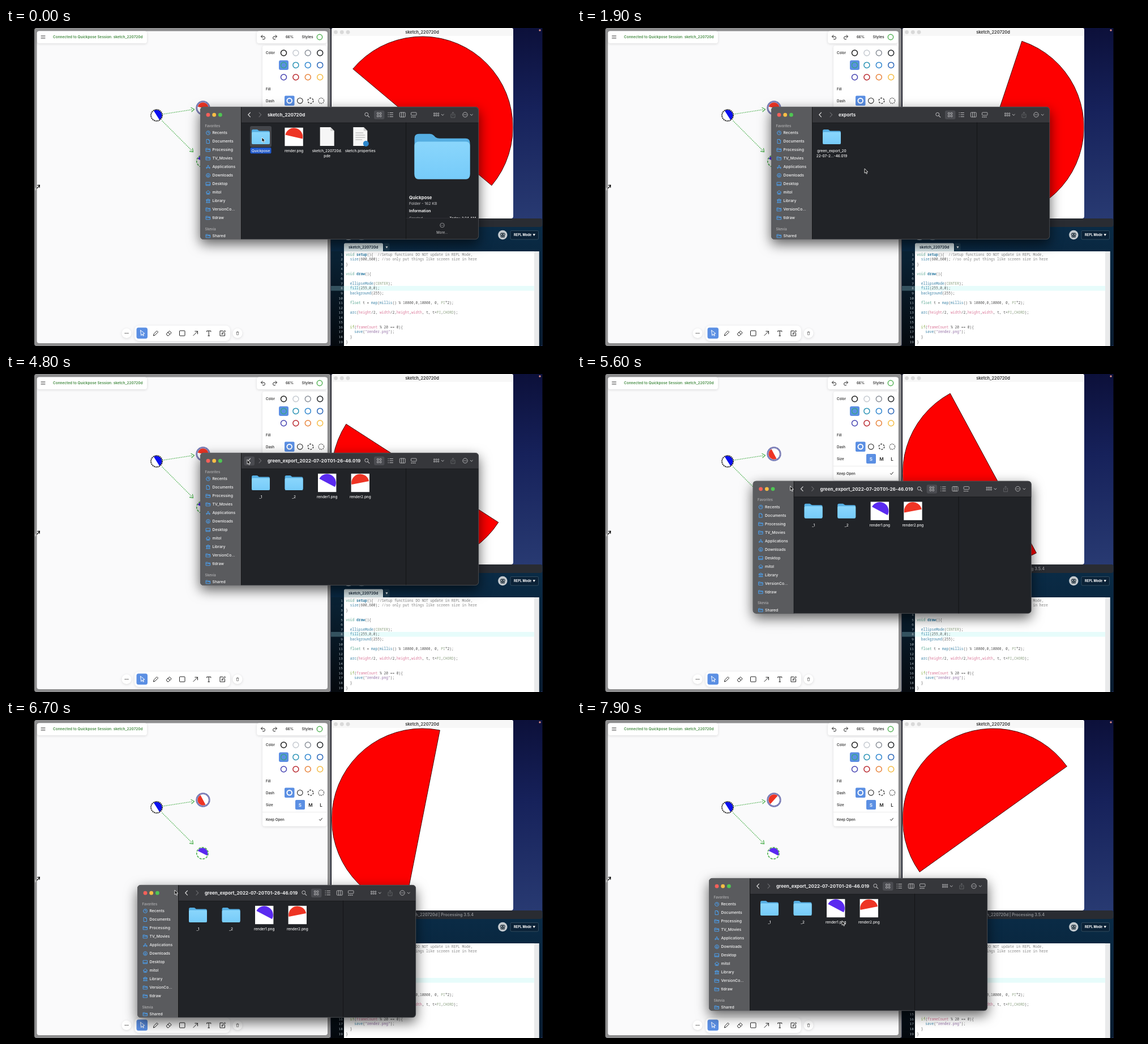
These frames come from a looping animation (998 px wide and 561 px high, 8000 ms). An HTML page:

```html
<!DOCTYPE html>
<html lang="en">
<head>
<meta charset="utf-8">
<title>Sketch session</title>
<style>
html, body { margin: 0; width: 100%; height: 100%; overflow: hidden; background: #000; }
svg { display: block; width: 998px; height: 561px; }
text { font-family: Inter, "Open Sans", sans-serif; white-space: pre; }
.code text { font-family: "Noto Sans Mono", "DejaVu Sans Mono", monospace; }
.panel { filter: drop-shadow(0 1px 2px rgba(0, 0, 0, .13)); }
#finder { filter: drop-shadow(0 8px 11px rgba(0, 0, 0, .62)); }
</style>
</head>
<body>
<svg id="stage" viewBox="0 0 998 561" xmlns="http://www.w3.org/2000/svg"></svg>
<script>
const LOOP = 8000, STEP = 100;
const BLUE = '#5b8fe3', GREEN = '#55b357', INK = '#222', SKY = '#4ba3f5';

// Drawing helpers
const rect = (x, y, w, h, fill, rx = 0, more = '') =>
  `<rect x="${x}" y="${y}" width="${w}" height="${h}" rx="${rx}" fill="${fill}" ${more}/>`;
const circle = (x, y, r, fill, more = '') => `<circle cx="${x}" cy="${y}" r="${r}" fill="${fill}" ${more}/>`;
const ring = (x, y, r, color, width = 1.3, more = '') =>
  circle(x, y, r, 'none', `stroke="${color}" stroke-width="${width}" ${more}`);
const line = (d, color = INK, width = 1, more = '') =>
  `<path d="${d}" fill="none" stroke="${color}" stroke-width="${width}" stroke-linecap="round" stroke-linejoin="round" ${more}/>`;
const fillPath = (d, color, more = '') => `<path d="${d}" fill="${color}" ${more}/>`;
const text = (x, y, str, size, fill = INK, weight = 500, anchor = 'start') =>
  `<text x="${x}" y="${y}" font-size="${size}" fill="${fill}" font-weight="${weight}" text-anchor="${anchor}">${str}</text>`;
const at = (x, y, body) => `<g transform="translate(${x} ${y})">${body}</g>`;

// Half disc closed by a chord, running clockwise from the given angle
function halfDisc(cx, cy, r, degrees) {
  const a = degrees * Math.PI / 180, dx = r * Math.cos(a), dy = r * Math.sin(a);
  return `M${cx + dx} ${cy + dy}A${r} ${r} 0 0 1 ${cx - dx} ${cy - dy}Z`;
}

const defs = `<defs>
  <linearGradient id="desk" x2="0" y2="1"><stop stop-color="#0c103a"/><stop offset=".25" stop-color="#16215a"/><stop offset=".6" stop-color="#283a72"/></linearGradient>
  <linearGradient id="ide" x2="0" y2="1"><stop stop-color="#0a2c47"/><stop offset="1" stop-color="#081c30"/></linearGradient>
  <linearGradient id="gutter" x2="0" y2="1"><stop stop-color="#0a2336"/><stop offset="1" stop-color="#05090e"/></linearGradient>
  <linearGradient id="front" x2="0" y2="1"><stop stop-color="#8ad6fc"/><stop offset="1" stop-color="#76cbf9"/></linearGradient>
  <clipPath id="canvasClip"><path d="M575.5 14H895.5V332Q895.5 335.5 892 335.5H579Q575.5 335.5 575.5 332Z"/></clipPath>
  <clipPath id="finderClip"><rect width="492" height="234" rx="6"/></clipPath>
  <clipPath id="infoClip"><rect x="364" y="28" width="128" height="168"/></clipPath>
</defs>`;

function board() {
  const panel = (x, y, w, h, r = 4) => rect(x, y, w, h, '#fff', r, 'class="panel"');
  const palette = [
    ['#1d1d1d', '#c6cbd1', '#8a9099', '#212528'],
    ['#38a58a', '#2b93b5', '#2f86cf', '#2a66b8'],
    ['#4340b0', '#b9282f', '#e8843c', '#f5bd45']];
  const swatches = palette.map((row, j) => row.map((c, i) =>
    ring(490.5 + i * 21.4, 44 + j * 21.4, 5, c, 1.5)).join('')).join('');
  const label = (y, s) => text(459, y, s, 6.2);

  const nodes =
    line('M277 152L330 143.8M276 164L329 217', GREEN, 1.5, 'stroke-dasharray="0.3 2.7"') +
    line('M327 140.5L332.5 143.5L328 147.5M329.5 212.5L330.5 218.5L324.5 217.5', GREEN, 1.4) +
    circle(266, 154, 10, '#fff') + fillPath(halfDisc(266, 154, 9.5, 238), '#0b10f0') +
    ring(266, 154, 10, '#111', 1.9, 'stroke-dasharray="1.9 1.2"') +
    circle(347, 235, 10, '#fff') + fillPath(halfDisc(347, 235, 9.5, 207), '#5a2af0') +
    ring(347, 235, 10.2, GREEN, 1.7, 'stroke-dasharray="4 1.8"') +
    circle(348, 141, 11, '#fff') + '<path id="redNode" fill="#ee3424"/>' +
    ring(348, 141, 11.3, '#7477b4', 2.8) + ring(348, 141, 11.3, '#a2a3c4', .9, 'stroke-dasharray="2 2"');

  const tools =
    circle(213, 538.5, 8.5, '#fff', 'class="panel"') + circle(409, 538.5, 8.5, '#fff', 'class="panel"') +
    [210.5, 213, 215.5].map(x => circle(x, 538.5, .75, INK)).join('') +
    line('M406.8 536.8H411.2M407.5 537V541.3H410.5V537M408.2 536.6V535.6H409.8V536.6', '#777', .8) +
    panel(227, 525, 169, 27, 8) + rect(230.5, 528.5, 19.5, 19.5, BLUE, 3.5) +
    line('M237.5 533.5L238.8 542.5L240.7 540L242.3 543.2L243.5 542.5L242 539.5L244.5 539Z', '#fff') +
    line('M260.5 542.5L261.3 539.5L266.5 534.2L268.6 536.3L263.4 541.6Z') +
    line('M283.5 539.5L288.5 534.3L292.2 537.6L287 542.8H285.5ZM286 537L289.7 540.4') +
    rect(306.5, 534, 9.5, 9, 'none', 1, `stroke="${INK}"`) +
    line('M331 542.5L338.5 535M333.8 535H338.5V539.7') +
    line('M354.7 535.8V534.3H361.8V535.8M358.2 534.3V543M356.8 543H359.6') +
    line('M383 534.3H378V543H386.5V538.5M381.3 540L382 537.8L386.3 533.5L387.6 534.8L383.4 539.2Z');

  return rect(50, 0, 523.5, 561, '#8e8e8f', 4) + rect(54.5, 5.5, 513.5, 550.5, '#fafafb', 4) +
    panel(55, 5.5, 194, 21.5) + panel(443, 5.5, 123.5, 21.5) + panel(453, 31, 113.5, 156.5) +
    line('M62 13.5H69M62 16H69M62 18.5H69', '#444', .8) +
    text(83, 18.4, 'Connected to Quickpose Session: sketch_220720d', 6.45, '#458c43', 600) +
    line('M453 12.5L450.5 15L453 17.5M450.7 15H455A2.5 2.5 0 0 1 455 20H453.5') +
    line('M476 12.5L478.5 15L476 17.5M478.3 15H474A2.5 2.5 0 0 0 474 20H475.5') +
    text(501, 18.3, '66%', 6.3, INK, 500, 'middle') + text(522.5, 18.4, 'Styles', 6.8) + ring(554, 16, 4.7, GREEN, 1.5) +
    rect(482, 57, 17, 17, BLUE, 3) + swatches +
    label(46, 'Color') + label(109.8, 'Fill') + label(130.6, 'Dash') + label(152.2, 'Size') + label(177.6, 'Keep Open') +
    rect(492, 119.5, 17.5, 17.5, BLUE, 2) + ring(500.7, 128.3, 4.3, '#fff', 2) + ring(519.3, 128.3, 4.8, INK, 1.1) +
    ring(538, 128.3, 4.8, INK, 1.3, 'stroke-dasharray="3 2"') + ring(556.8, 128.3, 4.8, INK, 1.3, 'stroke-dasharray="1.4 1.6"') +
    rect(511, 141, 17, 17, BLUE, 2) +
    ['S', 'M', 'L'].map((s, i) => text(519.3 + i * 18.6, 152.9, s, 8, i ? INK : '#fff', 600, 'middle')).join('') +
    line('M453 162.5H566', '#ececec') + line('M553.5 175.5L555.2 177.3L558.5 173.2') +
    line('M55 282.5L59 277.8M55.5 277.5L59.5 277.2L59 281.5', '#111', 1.2) +
    rect(51, 281.5, 2, 5, '#bbb', 1) + nodes + tools;
}

function sketchWindow() {
  return rect(575, 0, 321, 336, '#fff', 4) + rect(575, 0, 321, 14, '#f7f7f7', 3) +
    [582.5, 593.3, 604].map(x => circle(x, 7.3, 3.4, '#d9d9d9')).join('') +
    text(735, 10.1, 'sketch_220720d', 7.4, '#333', 600, 'middle') +
    '<path id="arc" fill="#fe0000" stroke="#300" stroke-width=".9" clip-path="url(#canvasClip)"/>';
}

const SOURCE = `void setup(){  //Setup functions DO NOT update in REPL Mode,
  size(600,600); //so only put things like screen size in here
}

void draw(){

  ellipseMode(CENTER);
  fill(255,0,0);
  background(255);

  float t = map(millis() % 10000,0,10000, 0, PI*2);

  arc(height/2, width/2,height,width, t, t+PI,CHORD);


  if(frameCount % 20 == 0){
    save("render.png");
  }
}`;
const SYNTAX = [
  [/^\/\//, '#858585'], [/^"/, '#9470a6'], [/^(void|float)$/, '#5faa96'], [/^if$/, '#86ab42'],
  [/^(height|width|frameCount)$/, '#dc7c9c'], [/^(CENTER|PI|CHORD)$/, '#8ea383'],
  [/^(setup|draw)$/, '#2f7ca3" font-weight="700'],
  [/^(size|ellipseMode|fill|background|map|millis|arc|save)$/, '#3d84a8']];
const highlight = s => s.replace(/\/\/.*|"[^"]*"|[a-z]\w*/gi, word => {
  const rule = SYNTAX.find(([pattern]) => pattern.test(word));
  return rule ? `<tspan fill="${rule[1]}">${word}</tspan>` : word;
});

function editor() {
  const rows = SOURCE.split('\n').map((s, i) => {
    const y = 401.5 + i * 8.56;
    return text(594.8, y, i + 1, 6, '#b4c0c8', 400, 'end') + text(600.3, y, highlight(s), 6.22, '#5c5c5c', 400);
  }).join('');
  return rect(574, 336, 373.5, 225, 'url(#ide)', 4) + rect(574, 336, 373.5, 15, '#292c32', 4) +
    text(826, 345.8, 'sketch_220720d | Processing 3.5.4', 7.1, '#8e9094', 600, 'end') +
    circle(605, 365.5, 8.7, '#c3d3dc') + circle(628, 365.5, 8.7, '#6f8796') +
    circle(877.3, 365, 8.2, '#c5cbd0') +
    line('M877.3 361V369.5M875 361L877.3 363.5L879.6 361', '#35444f', 1) +
    ring(875, 364.2, 1.7, '#35444f') + ring(879.6, 364.2, 1.7, '#35444f') + ring(875.3, 367.8, 1.3, '#35444f') + ring(879.3, 367.8, 1.3, '#35444f') +
    rect(891, 357.5, 49.5, 15.5, '#0b2237', 2, 'stroke="#3c5466" stroke-width=".8"') +
    text(897, 367.2, 'REPL Mode', 5.7, '#fff', 700) +
    fillPath('M930.5 363.2H935L932.7 367Z', '#fff') +
    fillPath('M597 394V382Q597 379.5 599.5 379.5H663.5Q666 379.5 666 382V394Z', '#d8e6e9') +
    text(605, 389.2, 'sketch_220720d', 6.5, '#123', 600) +
    fillPath('M667.5 394V379.5H675Q677.5 379.5 677.5 382V394Z', '#1d3c51') + fillPath('M670.5 385.3H674.5L672.5 388.7Z', '#fff') +
    rect(574, 394, 23, 167, 'url(#gutter)') + rect(597, 394, 344.5, 167, '#fff') + rect(933, 394, 8.5, 167, '#e9eaeb') +
    rect(574, 455, 23, 8.5, '#34525f') + rect(597, 455, 336, 8.5, '#e7fcfb') +
    `<g class="code">${rows}</g>`;
}

// Finder icons, centred on the origin
const folder = scale => `<g transform="scale(${scale}) translate(-50 -41.5)">` +
  fillPath('M0 74V9Q0 1 8 1H28Q32 1 35 4L38 7Q41 9 45 9H92Q100 9 100 17V74Z', '#55aee2') +
  rect(0, 15, 100, 67.5, 'url(#front)', 7) + '</g>';
const thumb = (color, angle) => rect(-16.2, -16.2, 32.4, 32.4, '#fff') + fillPath(halfDisc(0, 0, 15.6, angle), color);
const page = fillPath('M-12.5 -17H6L12.5 -10.5V16H-12.5Z', '#f6f6f6') + fillPath('M6 -17L12.5 -10.5H6Z', '#cfcfcf');
const settings = page + line('M-8 -7H5M-8 -3H8M-8 1H8M-8 5H3', '#aaa', 1.2) + circle(10, 12, 5, '#2b86cc');

const item = (column, icon, ...labels) => {
  const x = 107 + column * 58.6;
  return at(x, 53, icon) + labels.map((s, i) => text(x, 80.2 + i * 8.4, s, 6.4, '#f2f2f2', 500, 'middle')).join('');
};
const selection = width => rect(88, 34, 38, 37, '#43454a', 3) + rect(107 - width / 2, 72, width, 10.5, '#2059cd', 2);
const small = folder(.32);

function preview() {
  return `<g clip-path="url(#infoClip)">` + at(427.5, 87.5, folder(.98)) +
    text(369, 162.5, 'Quickpose', 7.7, '#f2f2f2', 700) + text(369, 173.2, 'Folder - 162 KB', 6.8, '#b5b5b7') +
    text(369, 186.3, 'Information', 6.8, '#f2f2f2', 700) +
    text(369, 198.5, 'Created', 6.4, '#a5a5a7') + text(487, 198.5, 'Today, 1:24 AM', 6.4, '#f2f2f2', 500, 'end') + '</g>' +
    line('M364 196.5H492', '#313236', .8) + ring(427.5, 209, 3.8, '#a9a9ab', .8) +
    [425.7, 427.5, 429.3].map(x => circle(x, 209, .6, '#a9a9ab')).join('') +
    text(427.5, 224, 'More...', 6, '#b5b5b7', 500, 'middle');
}

const VIEWS = [
  { from: 0, title: 'sketch_220720d', body: selection(37) + item(0, small, 'Quickpose') +
      item(1, thumb('#ee3424', 193), 'render.png') + item(2, page, 'sketch_220720d.', 'pde') +
      item(3, settings, 'sketch.properties') + preview() },
  { from: 600, title: 'Quickpose', body: item(0, small, 'exports') },
  { from: 1400, title: 'exports', body: item(0, small, 'green_export_20', '22-07-2...-46.019') },
  { from: 2900, title: 'green_export_2022-07-20T01-26-46.019', body: item(0, small, '_1') + item(1, small, '_2') +
      item(2, thumb('#5a2af0', 208), 'render1.png') + item(3, thumb('#ee3424', 169), 'render2.png') }];

function sidebar() {
  const places = ['Recents', 'Documents', 'Processing', 'TV_Movies', 'Applications', 'Downloads',
    'Desktop', 'mitol', 'Library', 'VersionCo...', 'tldraw'];
  const dir = 'M-3.5 -2.8H-.8L0 -1.8H3.5V2.8H-3.5ZM-3.5 -.6H3.5';
  const round = 'M-3.4 0A3.4 3.4 0 1 1 3.4 0A3.4 3.4 0 1 1 -3.4 0';
  const glyphs = {
    Recents: round + 'M0 -2V0H1.5', Documents: 'M-2.5 -3.5H.8L2.5 -1.8V3.5H-2.5ZM.8 -3.5V-1.8H2.5',
    Applications: 'M-2.8 3L0 -3L2.8 3M-3.5 1.3H3.5', Downloads: round + 'M0 -1.8V1.7M-1.4 .4L0 1.8L1.4 .4',
    Desktop: 'M-3.5 -2.8H3.5V2.8H-3.5ZM-3.5 1.2H3.5', mitol: 'M-3.7 0L0 -3.3L3.7 0M-2.7 -.5V3H2.7V-.5M-.7 3V1H.7V3',
    Library: 'M-3.5 -1.5L0 -3.5L3.5 -1.5ZM-3.5 3H3.5M-2.5 -1V2.5M0 -1V2.5M2.5 -1V2.5' };
  const row = (s, y) => at(14, y, line(glyphs[s] || dir, SKY, .95)) + text(21.5, y + 2.4, s, 6.85, '#f4f4f4');
  return rect(0, 0, 72.5, 234, '#5a5b5e') +
    ['#f5605a', '#f7bd45', '#4fc653'].map((c, i) => circle(14 + i * 10.7, 14.2, 3.4, c)).join('') +
    text(8.5, 35.7, 'Favorites', 6, '#a9a9ab', 600) + places.map((s, i) => row(s, 46 + i * 15)).join('') +
    text(8.5, 217.6, 'Skevia', 6, '#a9a9ab', 600) + row('Shared', 228);
}

function toolbar() {
  const gray = '#bcbcbe';
  const grid = (x, y, n, s, gap) => Array.from({ length: n * 2 }, (_, k) =>
    rect(x + (k % n) * gap, y + Math.floor(k / n) * gap, s, s, 'none', .5, `stroke="${gray}" stroke-width=".9"`)).join('');
  return rect(72.5, 0, 420, 28, '#36373b') + line('M72.5 28.3H492', '#17181a', .8) +
    rect(77.5, 6.5, 18.5, 16, '#4a4b50', 3, 'id="backHover"') +
    line('M88.5 10.2L84.8 14L88.5 17.8', '#e2e2e2', 1.1) + line('M104 10.2L107.7 14L104 17.8', '#68696c', 1.1) +
    ring(293.8, 13.3, 3, gray, 1) + line('M296 15.6L298.8 18.3', gray, 1.1) +
    rect(307, 6.5, 18.5, 15.5, '#4b4c51', 3) + grid(312.5, 10.3, 2, 2.8, 4.6) +
    [10.5, 14, 17.5].map(y => line(`M334.8 ${y}H340.5`, gray) + circle(332.2, y, .7, gray)).join('') +
    rect(352.3, 10, 10, 8, 'none', 1, `stroke="${gray}" stroke-width=".9"`) + line('M355.6 10V18M359 10V18', gray, .9) +
    rect(372.5, 10, 9.5, 5, 'none', 1, `stroke="${gray}" stroke-width=".9"`) + line('M373 18H382', gray, 1.3, 'stroke-dasharray="1 2"') +
    grid(412.5, 10.8, 3, 2, 3.6) + line('M426.3 13.3L428.3 15.2L430.3 13.3M477.3 13.3L479.3 15.2L481.3 13.3', gray) +
    line('M444.5 13H443V19H450V13H448.5M446.5 16V9.5M444.8 11L446.5 9.3L448.2 11', '#66676a', .9) +
    ring(468, 14, 4.2, gray, .9) + [466, 468, 470].map(x => circle(x, 14, .65, gray)).join('');
}

function finder() {
  const views = VIEWS.map((v, i) =>
    `<g id="view${i}">${text(119, 17, v.title, 8.1, '#ededee', 700)}${v.body}</g>`).join('');
  return `<g id="finder"><g clip-path="url(#finderClip)">` +
    rect(0, 0, 492, 234, '#212327') + sidebar() + toolbar() + line('M363.5 28V234M72.5 0V234', '#121315', .9) +
    `<g id="pick">${selection(56)}${rect(79, 81, 56, 9, '#2059cd', 2)}</g>` + views + '</g>' +
    rect(.3, .3, 491.4, 233.4, 'none', 6, 'stroke="#66676a" stroke-width=".6"') + '</g>';
}

const stage = document.getElementById('stage');
stage.innerHTML = defs + rect(0, 0, 998, 561, '#000') + rect(573, 0, 374.5, 561, 'url(#desk)') +
  circle(943, 4, 1.7, '#d98a86') + board() + rect(573.5, 0, 1.5, 561, '#16161c') + sketchWindow() + editor() + finder() +
  '<path id="cursor" d="M0 0V8L1.9 6.4L3.2 9.3L4.6 8.7L3.3 5.9H5.8Z" fill="#111" stroke="#fff" stroke-width=".8"/>';

// Pointer path: time, x, y
const POINTER = [
  [0, 452, 193], [1400, 452, 193], [1900, 508, 248], [2200, 508, 248], [2700, 455, 196], [3700, 455, 196],
  [4600, 426, 151], [5000, 426, 151], [5400, 409, 148], [5900, 317, 289], [6300, 298, 300],
  [7200, 298, 300], [7500, 299, 288], [7900, 468, 354], [LOOP, 468, 354]];
const DRAG = { start: 5400, end: 7500, dx: 66, dy: 9 };

function pointerAt(t) {
  const i = Math.max(1, POINTER.findIndex(k => k[0] >= t));
  const [t0, x0, y0] = POINTER[i - 1], [t1, x1, y1] = POINTER[i];
  const p = (t - t0) / (t1 - t0), e = p * p * (3 - 2 * p);
  return [x0 + (x1 - x0) * e, y0 + (y1 - y0) * e];
}

const el = id => document.getElementById(id);
const show = (id, on) => el(id).setAttribute('visibility', on ? 'visible' : 'hidden');
const move = (id, x, y) => el(id).setAttribute('transform', `translate(${x} ${y})`);

function render(t) {
  const [wx, wy] = pointerAt(Math.min(Math.max(t, DRAG.start), DRAG.end));
  move('cursor', ...pointerAt(t));
  move('finder', wx - DRAG.dx, wy - DRAG.dy);
  el('arc').setAttribute('d', halfDisc(735.3, 175, 160, 220 + t * .036));
  el('redNode').setAttribute('d', halfDisc(348, 141, 9.7, t < 5200 ? 193 : t < 7300 ? 62 : 132));
  VIEWS.forEach((v, i) => show('view' + i, t >= v.from && (i + 1 === VIEWS.length || t < VIEWS[i + 1].from)));
  show('pick', t >= 2700 && t < 2900);
  show('backHover', t >= 4500 && t < 5100);
}

const began = performance.now();
function tick(now) {
  const t = Math.max(0, now - began) % LOOP;
  render(Math.floor(t / STEP) * STEP);
  requestAnimationFrame(tick);
}
render(0);
requestAnimationFrame(tick);
</script>
</body>
</html>
```
